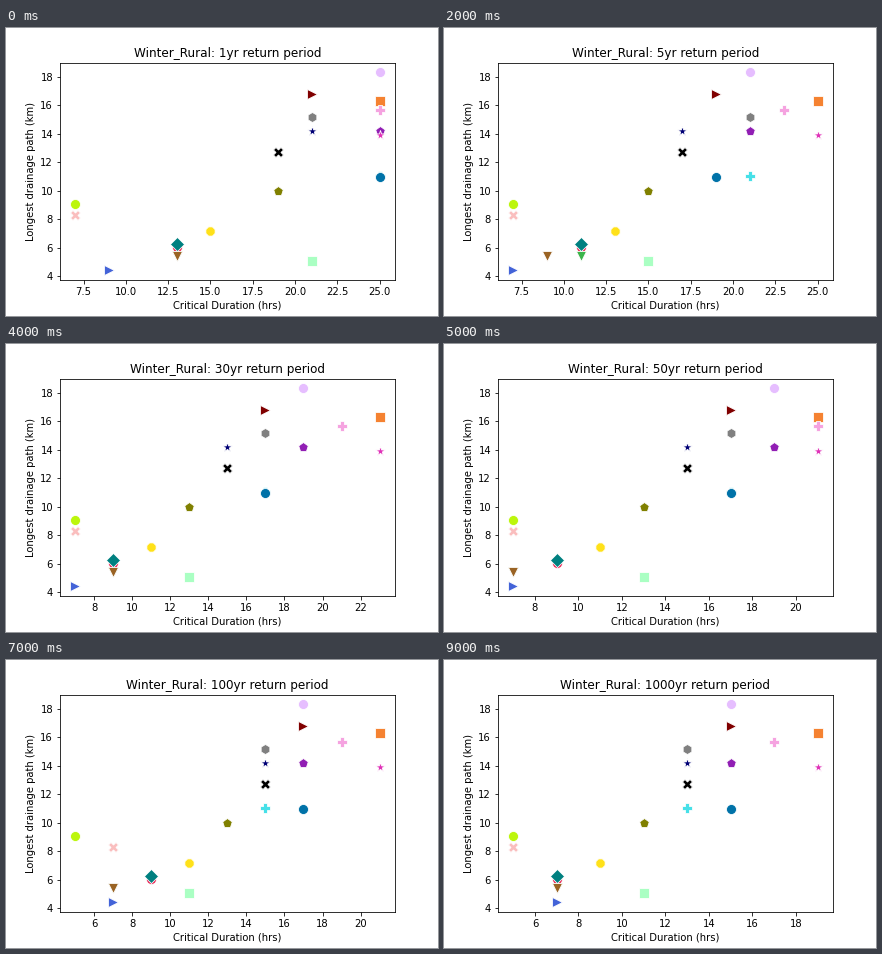
Recreate the animation shown at these times as a matplotlib script. Size 432 by 288 pixels, loop 10 s.

```python
from math import floor, log10

import matplotlib.pyplot as plt
from matplotlib.animation import FuncAnimation

PERIODS = [1, 2, 5, 10, 30, 50, 75, 100, 200, 1000]


class Site:
    """A catchment whose critical duration shrinks as storms get rarer."""

    def __init__(self, color, marker, path, base, slope, low=5, high=25):
        self.color, self.marker, self.path = color, marker, path
        self.base, self.slope = base, slope
        self.low, self.high = low, high

    def duration(self, period):
        # log-linear decline, rounded to odd whole hours
        hours = self.base - self.slope * log10(period - 0.9)
        return min(self.high, max(self.low, 2 * floor(hours / 2) + 1))


SITES = [
    Site("#e6194b", "o", 6.02, 11.6, 1.5),
    Site("#3cb44b", "v", 5.41, 11.3, 2, low=7),
    Site("#ffe119", "8", 7.15, 13.4, 1.7),
    Site("#4363d8", ">", 4.42, 7.6, 0.5),
    Site("#f58231", "s", 16.28, 27.04, 3),
    Site("#911eb4", "p", 14.22, 22.08, 2.18),
    Site("#46e0e8", "P", 11.06, 21.97, 3.2),
    Site("#e032b8", "*", 13.94, 27.04, 3),
    Site("#bcf60c", "o", 9.06, 6.9, 0.5),
    Site("#fabebe", "X", 8.28, 7, 0.5),
    Site("#008080", "D", 6.27, 11.6, 1.5),
    Site("#e6beff", "o", 18.3, 22.2, 2.2),
    Site("#9a6324", "v", 5.41, 10.52, 1.5),
    Site("#800000", ">", 16.79, 19.6, 1.5),
    Site("#aaffc3", "s", 5.03, 17.3, 3, low=11),
    Site("#808000", "p", 9.99, 16.7, 2),
    Site("#f5a3e0", "P", 15.66, 24.3, 2.5),
    Site("#000075", "*", 14.2, 18.7, 2),
    Site("#808080", "h", 15.15, 21.9, 3, high=21),
    Site("#000000", "X", 12.73, 17.6, 1.5),
    Site("#0072a8", "o", 10.95, 21.51, 2.5),
]

fig, ax = plt.subplots(figsize=(6, 4), dpi=72)
fig.subplots_adjust(left=0.125, right=0.9, bottom=0.125, top=0.88)


def limits(values):
    lo, hi = min(values), max(values)
    pad = 0.05 * (hi - lo)
    return lo - pad, hi + pad


def draw(step):
    period = PERIODS[step]
    hours = [site.duration(period) for site in SITES]
    ax.clear()
    for x, site in zip(hours, SITES):
        ax.scatter(x, site.path, s=100, color=site.color, marker=site.marker,
                   edgecolor="white", linewidth=0.8)
    ax.set_xlim(limits(hours))
    ax.set_ylim(limits([site.path for site in SITES]))
    ax.set_xlabel("Critical Duration (hrs)", fontsize=10)
    ax.set_ylabel("Longest drainage path (km)", fontsize=10)
    ax.set_title(f"Winter_Rural: {period}yr return period", fontsize=12)


anim = FuncAnimation(fig, draw, frames=len(PERIODS), init_func=lambda: None,
                     interval=1000, repeat=True, repeat_delay=0)
plt.show()
```
